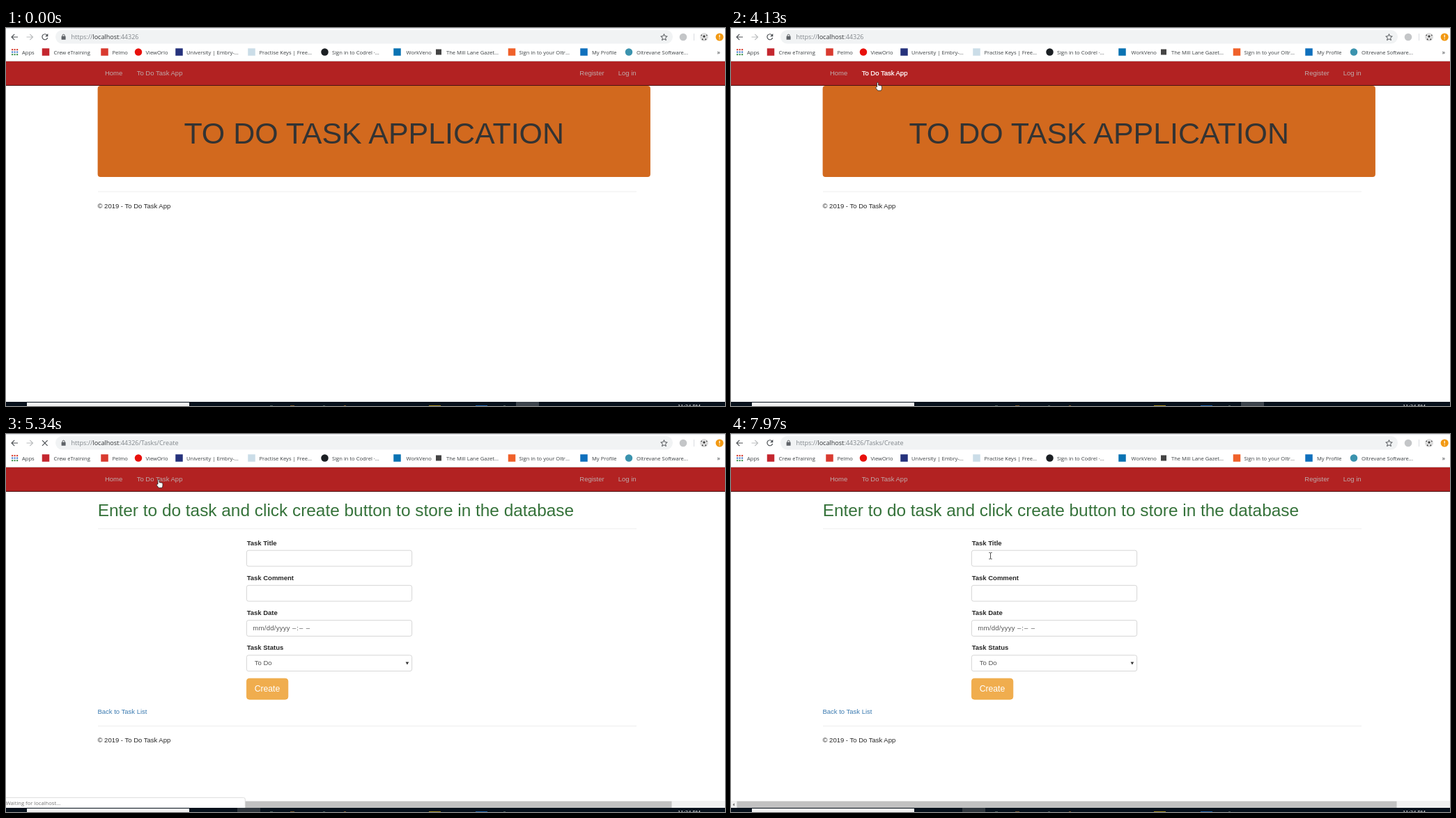
An HTML page for the animation above (8000 ms loop, 1032 by 543 pixels).

```html
<!DOCTYPE html>
<html lang="en">
<head>
<meta charset="utf-8">
<title>To Do Task App</title>
<style>
  html, body { margin: 0; width: 100%; height: 100%; overflow: hidden; background: #fff; }
  svg { display: block; }
  text { font: 9.49px "Liberation Sans", Arial, sans-serif; fill: #262626; white-space: pre; }
  .ui { font: 7.6px "Open Sans", "Noto Sans", sans-serif; fill: #3c4043; }
  .url { font: 9.05px "Open Sans", "Noto Sans", sans-serif; fill: #80868b; }
  .url .host { fill: #303336; }
  .nav { fill: #bfaaaa; }
  .nav.hover { fill: #fff; stroke: #fff; stroke-width: .25; }
  .label { font-weight: bold; }
  .value { fill: #555; }
  .field { fill: #fff; stroke: #ccc; stroke-width: .8; }
  .rule { stroke: #eee; }
  .line { fill: none; stroke: #4d5155; stroke-width: 1.2; }
</style>
</head>
<body>
<svg width="1032" height="543" viewBox="0 0 1032 543">
  <rect width="1032" height="543" fill="#fff"/>

  <!-- browser toolbar -->
  <path d="M0 .5H1032" stroke="#dee1e6"/>
  <rect x="71" y="3" width="886" height="19.5" rx="9.75" fill="#f1f3f4"/>
  <path class="line" d="M17 13H8M12.2 8.8L8 13L12.2 17.2"/>
  <path class="line" d="M29.5 13H38.5M34.3 8.8L38.5 13L34.3 17.2" style="stroke:#babcbe"/>
  <g id="reload">
    <path class="line" d="M59 10.2A4 4 0 1 0 59.7 14"/>
    <path d="M60.3 8V12.2H56.1Z" fill="#4d5155"/>
  </g>
  <path id="stop" class="line" d="M52 9.2L59.6 16.8M59.6 9.2L52 16.8"/>
  <rect x="79.6" y="11.8" width="6" height="5" rx=".6" fill="#5f6368"/>
  <path class="line" d="M81 12V10.8A1.6 1.6 0 0 1 84.2 10.8V12" style="stroke-width:.9"/>
  <text class="url" x="93.5" y="16.2">https://<tspan class="host">localhost</tspan>:44326<tspan id="path"></tspan></text>
  <path class="line" style="stroke-width:1" d="M944.5 8.6L945.8 11.7L949.2 12L946.6 14.2L947.4 17.5L944.5 15.8L941.6 17.5L942.4 14.2L939.8 12L943.2 11.7Z"/>
  <circle cx="972" cy="13" r="5.3" fill="#c4c6c8"/>
  <path d="M987.5 8V18" stroke="#dadce0"/>
  <circle cx="1002" cy="13" r="6" fill="#dedede"/>
  <path d="M1000.4 11.5L1002 10.3L1003.6 11.5L1003 13.5H1001ZM997 10.5L999 9.2L998.6 11.5ZM1007 10.5L1005 9.2L1005.4 11.5ZM998.6 16.8L999.8 14.8L1001 17.5ZM1005.4 16.8L1004.2 14.8L1003 17.5Z" fill="#333"/>
  <circle cx="1024.2" cy="13" r="5.6" fill="#f29913"/>
  <path d="M1024.2 9.8V13.8M1024.2 15V16.2" stroke="#fff" stroke-width="1.2"/>
  <g id="bookmarks"></g>
  <text class="ui" x="1020.5" y="37.5" style="font-size:9px">»</text>

  <!-- site header -->
  <path d="M0 47.5H1032" stroke="#d6d0d0"/>
  <rect y="48" width="1032" height="34" fill="#b22222"/>
  <path d="M0 82.5H1032" stroke="#4a1212"/>
  <text class="nav" x="142" y="68">Home</text>
  <text class="nav" id="link" x="187.7" y="68">To Do Task App</text>
  <text class="nav" x="823.3" y="68">Register</text>
  <text class="nav" x="878.8" y="68">Log in</text>

  <g id="home">
    <rect x="131.6" y="83" width="793.3" height="131" rx="4" fill="#d2691e"/>
    <text x="528.2" y="165.8" text-anchor="middle" style="font-size:42.95px;fill:#333">TO DO TASK APPLICATION</text>
    <path class="rule" d="M132 235H905"/>
    <text x="131.5" y="258.5">© 2019 - To Do Task App</text>
  </g>

  <g id="form">
    <text x="131.7" y="117.5" style="font-size:24.4px;fill:#35723a">Enter to do task and click create button to store in the database</text>
    <path class="rule" d="M132 136H905M132 419.5H905"/>
    <g id="fields"></g>
    <text class="value" x="354.3" y="282.3" letter-spacing=".3">mm/dd/yyyy</text>
    <text class="value" x="411" y="282.3" letter-spacing="1">–:– –</text>
    <text class="value" x="356.8" y="332.2">To Do</text>
    <path d="M573.6 327.4H578.2L575.9 331.6Z" fill="#333"/>
    <rect x="345.4" y="351.2" width="59.4" height="30" rx="4" fill="#f0ad4e" stroke="#eea236" stroke-width=".7"/>
    <text x="375" y="370.4" text-anchor="middle" style="font-size:12.2px;fill:#fff">Create</text>
    <text x="131.5" y="401.8" style="fill:#3a7ab0">Back to Task List</text>
    <text x="131.5" y="443.2">© 2019 - To Do Task App</text>
    <rect y="527" width="1032" height="10.5" fill="#f1f1f1"/>
    <rect x="8.5" y="527.6" width="947" height="9.4" fill="#c1c1c1"/>
    <path d="M5 530.2V534.6L2.4 532.4Z" fill="#777"/>
  </g>

  <g id="status">
    <path d="M-1 522.3H340.5Q343.3 522.3 343.3 525V538H-1Z" fill="#fff" stroke="#d4d4d4" stroke-width=".8"/>
    <text class="ui" id="statusText" x="-.3" y="532.7" style="fill:#757575"></text>
  </g>

  <!-- taskbar -->
  <rect y="537" width="1032" height="6" fill="#07111c"/>
  <rect x="30" y="538" width="233" height="5" fill="#f3f3f3"/>
  <rect id="activeTask" y="537" width="33" height="6"/>
  <path d="M379 542.5H383M455 542.5H458M714 542.5H717" stroke="#455"/>
  <path d="M408 542.5H414M485 542.5H488" stroke="#76552a"/>
  <path d="M607 542.5H624" stroke="#a58c1c"/>
  <path d="M674 542.5H691" stroke="#1d5fa8"/>
  <text class="ui" x="964" y="546.4" style="fill:#fff">11:34 PM</text>

  <g id="pointer" stroke="#222" stroke-width=".8" stroke-linejoin="round" fill="#fff">
    <path id="arrow" d="M0 0V8.8L2 7L3.4 10L4.8 9.4L3.5 6.5H6.1Z"/>
    <path id="hand" d="M-1 6.6V1Q-1 0 0 0T1 1V4L4.6 4.6Q6 4.9 6 6.2V8.6Q6 10.2 4.8 11.8H.2L-2.7 8Q-3.2 6.8-2 6.6Z"/>
    <path id="beam" fill="none" d="M-2.2-4.5H-.6L0-4L.6-4.5H2.2M0-4V4M-2.2 4.5H-.6L0 4L.6 4.5H2.2"/>
  </g>
</svg>

<script>
const LOOP = 8000, HOVER_STATUS = 4590, CLICK = 5000, WAITING = 5080, PAGE = 5340, LOADED = 5400;
const el = id => document.getElementById(id);
const show = (id, on) => el(id).style.display = on ? '' : 'none';

// icon centre, icon colour, round icon?, text x, title
const bookmarks = [
  [57, '#c4262e', 0, 68.5, 'Crew eTraining'],
  [141.5, '#d93a2f', 0, 152.5, 'Pelmo'],
  [190, '#e8100c', 1, 200.5, 'ViewOrlo'],
  [248.5, '#26327c', 0, 259, 'University | Embry-...'],
  [352.5, '#cbdde8', 0, 363.5, 'Practise Keys | Free...'],
  [457.5, '#1b1f23', 1, 468, 'Sign in to Codrel ·...'],
  [561.5, '#0a73b3', 0, 574.5, 'WorkVeno'],
  [621, '#444444', 0, 632, 'The Mill Lane Gazet...'],
  [726, '#f0612a', 0, 736.5, 'Sign in to your Oltr...'],
  [829.5, '#0f70bd', 0, 841, 'My Profile'],
  [894, '#3b93ae', 1, 905, 'Oltrevane Software...']
];

let bar = '<text class="ui" x="23" y="37.5">Apps</text>';
const dotColors = ['#d9483b', '#4a80d0', '#4c9a5a'];
for (let i = 0; i < 9; i++) {
  const col = i % 3, row = (i - col) / 3;
  bar += `<rect x="${8 + col * 3.5}" y="${30 + row * 3.5}" width="2.2" height="2.2" fill="${dotColors[row]}"/>`;
}
for (const [x, color, round, textX, title] of bookmarks) {
  const size = title.startsWith('The') ? 8 : 10.5;
  bar += `<rect x="${x - size / 2}" y="${34.5 - size / 2}" width="${size}" height="${size}" rx="${round ? size / 2 : 0}" fill="${color}"/>
    <text class="ui" x="${textX}" y="37.5">${title}</text>`;
}
el('bookmarks').innerHTML = bar;

el('fields').innerHTML = ['Title', 'Comment', 'Date', 'Status'].map((name, i) => {
  const y = 159.7 + i * 50.2;
  return `<text class="label" x="345.7" y="${y}">Task ${name}</text>
    <rect class="field" x="345.4" y="${y + 7.5}" width="237.2" height="22.8" rx="2.7"/>`;
}).join('');

// pointer moves: start, end, number of steps, path
const moves = [
  [1090, 1310, 4, [[795, 434], [622, 379]]],
  [1630, 2380, 10, [[592.5, 388], [300, 250], [155, 190], [206, 146]]],
  [2760, 3510, 10, [[207, 145], [197, 120], [206, 95.5]]],
  [3900, 4450, 9, [[208, 93], [210, 79], [214, 72], [217, 67]]],
  [4590, 4730, 3, [[218, 67], [219, 65.5]]],
  [6170, 6400, 4, [[248.5, 84.7], [350, 132]]],
  [6800, 7270, 7, [[350, 134], [368, 173]]],
  [7740, 7740, 1, [[374, 174]]],
  [7890, 7970, 2, [[368, 174], [372.5, 175]]]
];

function pointerAt(t) {
  const move = moves.filter(m => m[0] <= t).pop();
  if (!move) return null;
  const [start, end, steps, path] = move;
  const gaps = Math.max(1, steps - 1);
  const progress = end > start ? Math.min(gaps, Math.floor((t - start) / (end - start) * gaps)) / gaps : 0;
  const at = progress * (path.length - 1);
  const i = Math.floor(at), a = path[i], b = path[i + 1] || a;
  return a.map((v, k) => v + (b[k] - v) * (at - i));
}

function render(t) {
  const onForm = t >= PAGE, loading = t >= CLICK && t < LOADED;
  show('home', !onForm);
  show('form', onForm);
  show('stop', loading);
  show('reload', !loading);
  el('path').textContent = t >= CLICK ? '/Tasks/Create' : '';

  const fadeIn = (t - HOVER_STATUS) / 140, fadeOut = (5790 - t) / 170;
  el('status').style.opacity = Math.max(0, Math.min(1, fadeIn, fadeOut));
  el('statusText').textContent = t < WAITING ? 'https://localhost:44326/Tasks/Create' : 'Waiting for localhost...';
  el('activeTask').setAttribute('x', t < CLICK ? 732 : 332);
  el('activeTask').setAttribute('fill', t < CLICK ? '#3d444c' : '#30373e');

  const p = pointerAt(t);
  show('pointer', p);
  const overLink = !!p && p[1] > 48 && p[1] < 82 && p[0] > 178 && p[0] < 264;
  const overField = !!p && onForm && p[1] > 167;
  el('link').classList.toggle('hover', overLink && !onForm);
  show('hand', overLink);
  show('beam', overField);
  show('arrow', !overLink && !overField);
  if (p) el('pointer').setAttribute('transform', `translate(${p})`);
}

const origin = performance.now();
function tick() {
  render((performance.now() - origin) % LOOP);
  requestAnimationFrame(tick);
}
tick();
</script>
</body>
</html>
```
